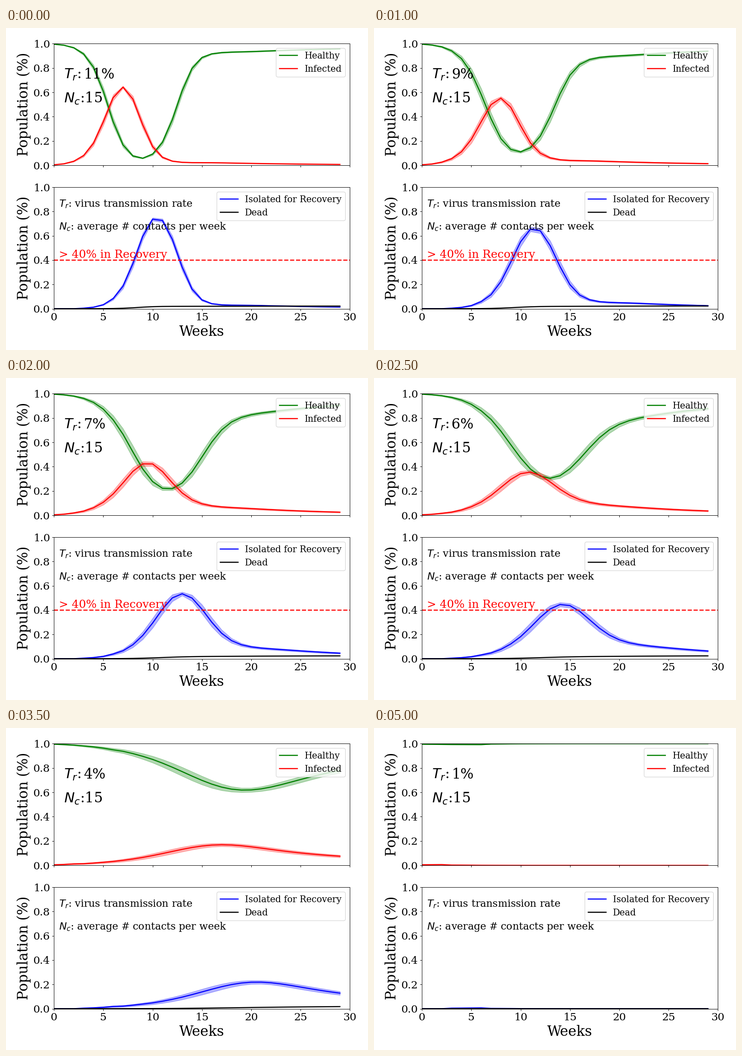
Recreate the animation shown at these times as a matplotlib script. Size 794 by 706 pixels, loop 5.5 s.

```python
import numpy as np
import matplotlib.pyplot as plt
from matplotlib.animation import FuncAnimation

W, H, DPI = 794, 706, 72
K = 88 / 72                   # pixels per nominal point
WEEKS = 30
SICK, ISOLATED = 3, 4         # weeks spent in each stage
CONTACTS = 15
DEATH = 0.02
SEED = 0.005
RATES = list(range(11, 0, -1))

plt.rcParams.update({
    "font.family": "DejaVu Serif",
    "axes.linewidth": 0.8 * K,
    "lines.linewidth": 2 * K,
    "patch.linewidth": K,
    "xtick.major.size": 3.5 * K, "ytick.major.size": 3.5 * K,
    "xtick.major.pad": 3.5 * K, "ytick.major.pad": 3.5 * K,
    "xtick.major.width": 0.8 * K, "ytick.major.width": 0.8 * K,
    "xtick.labelsize": 19 * K, "ytick.labelsize": 19 * K,
    "legend.fontsize": 16 * K,
})


def force(x):
    """Weekly infection chance for an uneven number of contacts."""
    return 1 - (1 + x / 3) ** -3


def simulate(rate, seed=SEED):
    """Weekly shares of healthy, infected, isolated and dead people."""
    gain = np.interp(rate, [5, 11], [0.95, 0.987])
    beta = CONTACTS * rate / 100 * gain
    out = SICK + ISOLATED
    pad = out + 1
    total = np.zeros(WEEKS + pad)       # cumulative infections
    total[pad] = seed
    naive = 1 - seed
    rows = []
    for t in range(pad, WEEKS + pad):
        infected = total[t] - total[t - SICK]
        isolated = (1 - DEATH) * (total[t - SICK] - total[t - out])
        dead = DEATH * total[t - SICK]
        healthy = 1 - infected - isolated - dead
        rows.append((healthy, infected, isolated, dead))
        if t + 1 < len(total):
            fresh = (1 - DEATH) * (total[t - out] - total[t - out - 1])
            immune = max(healthy - naive - fresh, 0)
            caught = naive * force(beta * infected)
            again = (fresh * force(min(beta, 0.75) * infected)
                     + immune * force(min(beta, 0.285) * infected))
            naive -= caught
            total[t + 1] = total[t] + caught + again
    return np.array(rows).T


def with_spread(rate):
    """Mean and deviation over outbreaks with a random start."""
    noise = np.interp(rate, [1, 3, 5, 9, 11], [0.05, 0.25, 0.21, 0.18, 0.12])
    step = 3 ** 0.5 * noise
    low, mid, high = (simulate(rate, SEED * s) for s in (1 - step, 1, 1 + step))
    mean = (low + 4 * mid + high) / 6
    drift = (high - low) / (2 * 3 ** 0.5)
    scatter = 0.15 * noise * np.sqrt(np.clip(mean * (1 - mean), 0, None))
    spread = np.hypot(drift, scatter)
    spread[:, 0] = 0
    return mean, spread


RUNS = [with_spread(rate) for rate in RATES]
weeks = np.arange(WEEKS)

fig = plt.figure(figsize=(W / DPI, H / DPI), dpi=DPI, facecolor="white")


def panel(top, bottom):
    ax = fig.add_axes([105.3 / W, 1 - bottom / H, 648.7 / W, (bottom - top) / H])
    ax.set(xlim=(0, 30), ylim=(0, 1))
    ax.set_xticks(range(0, 31, 5))
    ax.set_yticks(np.linspace(0, 1, 6))
    fig.text(48 / W, 1 - (top + bottom) / 2 / H, "Population (%)",
             size=25 * K, rotation=90, rotation_mode="anchor",
             ha="center", va="baseline")
    return ax


def curve(ax, color, label, band=True):
    line, = ax.plot(weeks, weeks * 0, color=color, label=label)
    area = None
    if band:
        area = ax.fill_between(weeks, weeks * 0, weeks * 0,
                               color=color, alpha=0.3)
    return line, area


upper = panel(34.2, 301.2)
lower = panel(349.2, 615.5)
upper.tick_params(labelbottom=False)
fig.text(429.6 / W, 1 - 675 / H, "Weeks", size=25 * K, ha="center")

curves = [
    curve(upper, "green", "Healthy"),
    curve(upper, "red", "Infected"),
    curve(lower, "blue", "Isolated for Recovery"),
    curve(lower, "black", "Dead", band=False),
]
for ax in (upper, lower):
    ax.legend(loc="upper right")

upper.text(1, 0.713, "$T_r$:", size=25 * K)
rate_text = upper.text(3, 0.713, "", size=25 * K)
upper.text(1, 0.513, f"$N_c$:{CONTACTS}", size=25 * K)
lower.text(0.5, 0.837, "$T_r$: virus transmission rate", size=18 * K)
lower.text(0.5, 0.653, "$N_c$: average # contacts per week", size=18 * K)
alert = [
    lower.axhline(0.4, color="red", ls="--", lw=2 * K),
    lower.text(0.5, 0.42, "> 40% in Recovery", color="red", size=20 * K),
]


def update(i):
    mean, spread = RUNS[i]
    for (line, area), y, s in zip(curves, mean, spread):
        line.set_ydata(y)
        if area is not None:
            xs = np.concatenate([weeks, weeks[::-1]])
            ys = np.concatenate([y - s, (y + s)[::-1]])
            area.set_verts([np.column_stack([xs, ys])])
    rate_text.set_text(f"{RATES[i]}%")
    for artist in alert:
        artist.set_visible(mean[2].max() > 0.4)
    return []


anim = FuncAnimation(fig, update, frames=len(RATES), interval=500,
                     repeat=True, repeat_delay=0, blit=False)
plt.show()
```
